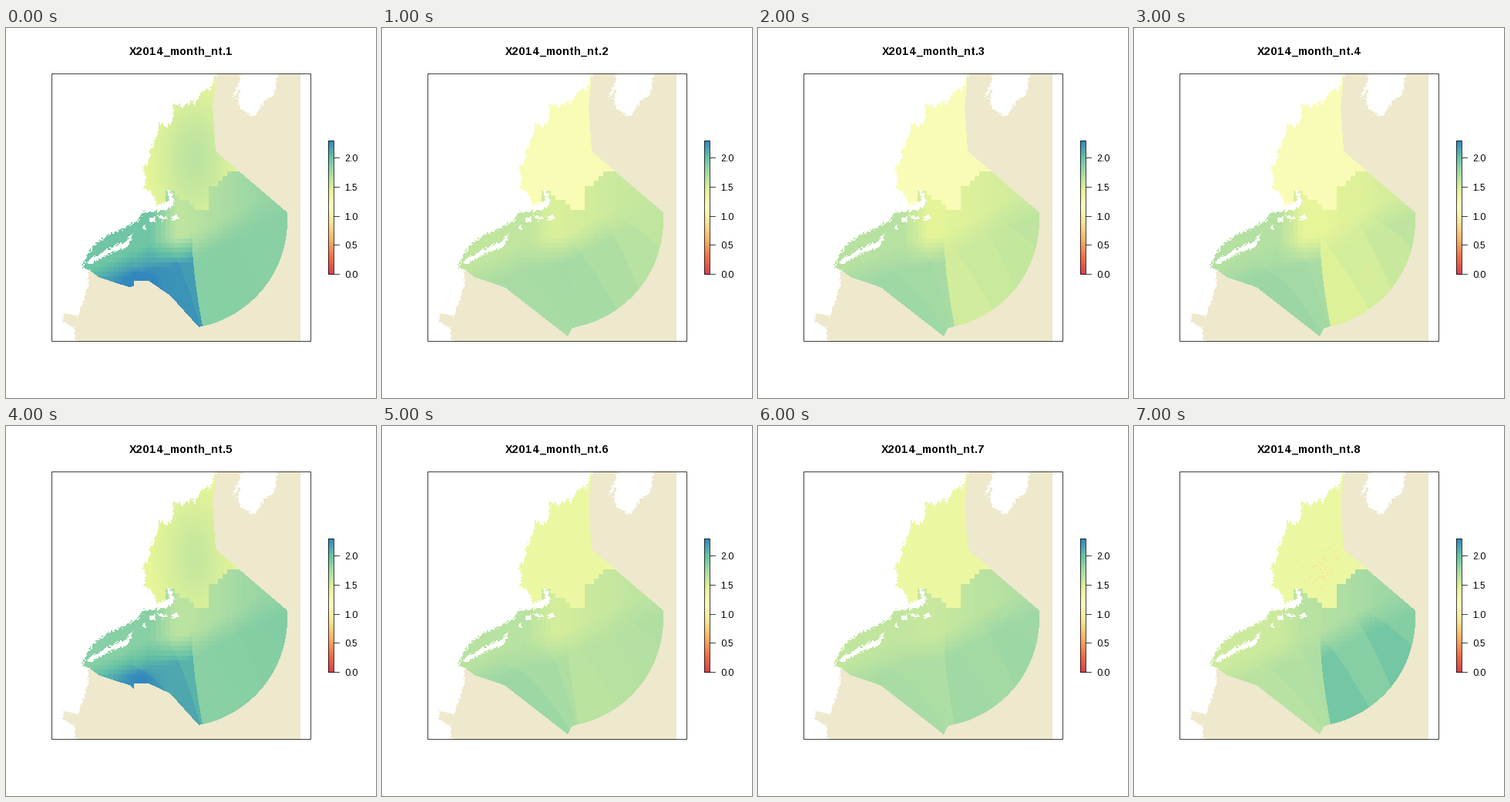
Animation of 480x480 px, one loop 8000 ms. Source, as a matplotlib script:

```python
import numpy as np
import matplotlib.pyplot as plt
from matplotlib.animation import FuncAnimation
from matplotlib.colors import LinearSegmentedColormap
from matplotlib.patches import Rectangle
from matplotlib.path import Path

# whole-pixel glyph advances
plt.rcParams["text.hinting_factor"] = 1

SIZE = 480
TOP = 2.3
BEIGE = np.array([238, 232, 205]) / 255
SPECTRAL = LinearSegmentedColormap.from_list("spectral9", [
    "#D53E4F", "#F46D43", "#FDAE61", "#FEE08B", "#FFFFBF",
    "#E6F598", "#ABDDA4", "#66C2A5", "#3288BD"], N=512)

rng = np.random.default_rng(3)
Y, X = np.mgrid[:SIZE, :SIZE] + 0.5

# Centres of the coarse data cells
CELL = 6.2
BX = (np.floor((X - 2.2) / CELL) + 0.5) * CELL + 2.2
BY = (np.floor(Y / CELL) + 0.5) * CELL


def inside(points, x=X, y=Y):
    pts = np.column_stack([x.ravel(), y.ravel()])
    return Path(points).contains_points(pts).reshape(x.shape)


def ramp(a, b, x):
    return np.clip((x - a) / (b - a), 0, 1)


def bump(x, y, sx, sy):
    return np.exp(-((X - x) / sx) ** 2 - ((Y - y) / sy) ** 2)


# --- land --------------------------------------------------------------
MAINLAND = [
    (20, 20), (274, 20), (272, 64), (268, 74), (262, 81), (250, 88),
    (236, 97), (229, 102), (217, 98), (217, 118), (197, 128), (197, 138),
    (187, 158), (184, 176), (177, 180), (182, 196), (179, 208), (190, 214),
    (196, 230), (213, 224), (208, 210), (216, 214), (218, 229), (206, 237),
    (176, 240), (172, 250), (130, 271), (112, 283), (97, 312), (107, 314),
    (107, 335), (93, 374), (74, 370), (74, 381), (90, 391), (91, 430),
    (20, 430)]
LONG_ISLE = [(102, 306), (110, 299), (135, 286), (156, 276), (167, 264),
             (157, 284), (138, 291), (112, 305)]
NE_BAY = [(307, 50), (356, 50), (346, 88), (335, 95), (322, 116),
          (303, 104), (300, 92), (303, 82), (301, 76)]
INLET = [(293, 94), (297, 82), (308, 61), (300, 82)]
ISLES = [(203, 246, 6, 2.5), (219, 246, 5, 2.5), (190, 249, 4, 3),
         (179, 259, 3, 2)]  # x, y, radii


def land_mask():
    gx, gy = (X // 2).astype(int), (Y // 2).astype(int)
    # deep narrow inlets in the north, a slightly frayed edge elsewhere
    rough = np.where(X < 285, ramp(200, 130, Y), 0)
    dx, dy = rng.normal(0, 1.1, (2, 240, 240))[:, gy, gx]
    inlets = rough * rng.normal(0, 3.5, 240)[gx]
    x, y = X + dx, Y + dy
    mask = inside(MAINLAND, x, y + inlets)
    for shape in (LONG_ISLE, NE_BAY, INLET):
        mask |= inside(shape, x, y)
    for cx, cy, rx, ry in ISLES:
        mask |= ((x - cx) / rx) ** 2 + ((y - cy) / ry) ** 2 < 1
    return mask


# --- study area --------------------------------------------------------
angle = np.linspace(np.radians(-4.5), np.radians(77.5), 40)
ARC = list(zip(224.7 + 140.3 * np.cos(angle), 250 + 140.3 * np.sin(angle)))
NORTH = [(96, 250), (150, 40), (271, 40), (271, 76), (268, 100), (272, 160)]
WEST = [(150, 333), (120, 323), (108, 314), (96, 313)]
TIP = [(246, 390), (241, 400), (160, 337)]


def notched(y):
    return [(250, 388), (213, 347), (185, y), (166, y), (166, y + 7),
            (160, 336)]


land = land_mask()
box = (X > 59) & (X < 382) & (Y > 59) & (Y < 407)


def sea_mask(south):
    return inside(NORTH + ARC + south + WEST) & box & ~land


open_sea = sea_mask(TIP)
cut_sea = {1: sea_mask(notched(328)), 5: sea_mask(notched(334))}

GULF = inside([
    (150, 40), (310, 40), (310, 186), (293, 186), (272, 204), (262, 205),
    (262, 230), (257, 236), (244, 236), (238, 226), (220, 217), (219, 210),
    (207, 210), (207, 236), (150, 236)], BX, BY)

# Curves fanning out over the slope: head, foot and bend
RAYS = [((165, 312), (244, 395), 0.65), ((212, 285), (252, 387), 0.75),
        ((242, 285), (255, 387), 1.5), ((242, 275), (305, 365), 0.8),
        ((285, 250), (333, 338), 0.75), ((295, 238), (358, 282), 0.8)]
wedge = np.zeros((SIZE, SIZE), int)
for (x0, y0), (x1, y1), bend in RAYS:
    wedge += X > x0 + (x1 - x0) * ramp(y0, y1, Y) ** bend

shelf_edge = np.interp(BX, [100, 185, 240, 370], [335, 299, 287, 222])
deep = ramp(-20, 16, BY - shelf_edge)
eastward = ramp(230, 330, BX)
inshore = ramp(222, 188, BX)

# Levels: gulf, tongue, bank, shelf, west slope (outer, inner),
# east slope (inner, outer)
LEVELS = {
    1: (1.40, 1.63, 1.80, 1.97, 2.28, 2.20, 1.87, 1.86),
    2: (1.23, 1.50, 1.60, 1.62, 1.73, 1.75, 1.74, 1.62),
    4: (1.21, 1.42, 1.52, 1.68, 1.79, 1.73, 1.48, 1.63),
    5: (1.39, 1.64, 1.80, 1.87, 2.20, 2.08, 1.86, 1.89),
    6: (1.36, 1.53, 1.63, 1.66, 1.78, 1.70, 1.65, 1.69),
    8: (1.36, 1.66, 1.78, 1.56, 1.66, 1.71, 1.91, 1.92)}


def blend(a, b, t):
    return np.array(LEVELS[a]) * (1 - t) + np.array(LEVELS[b]) * t


LEVELS[3] = blend(4, 2, 0.25)
LEVELS[7] = blend(6, 8, 0.4)

# Speck clouds: centre, spread, count
SPECKS = {4: [(303, 322, 12, 17, 22), (292, 208, 11, 6, 9)],
          8: [(245, 190, 14, 18, 70)]}


def add_specks(field, month):
    for x, y, sx, sy, count in SPECKS.get(month, []):
        for px, py in rng.normal((x, y), (sx, sy), (count, 2)).astype(int):
            field[py, px:px + 2] = 0.85


def month_field(month):
    gulf, tongue, bank, shelf, w_out, w_in, e_in, e_out = LEVELS[month]
    cold = max(0, w_out - 1.8)
    ripple = 0.2 * max(0, e_in - w_in)

    west = np.linspace(w_out, w_in, 3)
    east = np.linspace(e_in, e_out, 4) + ripple * np.array([1, -1, 1, -1])
    slope = np.concatenate([west, east])[wedge]

    shallow = tongue + (bank - tongue) * eastward
    shallow += (shelf - shallow) * inshore
    field = shallow + (slope - shallow) * deep
    field += 0.25 * cold * bump(175, 330, 22, 13)
    field[GULF] = (gulf + 0.5 * cold * bump(245, 170, 48, 85))[GULF]
    add_specks(field, month)
    return field


def month_image(month):
    sea = cut_sea.get(month, open_sea)
    img = np.ones((SIZE, SIZE, 3))
    img[box & ~land] = BEIGE
    img[sea] = SPECTRAL(month_field(month)[sea] / TOP)[:, :3]
    return img


images = [month_image(m) for m in range(1, 9)]

# --- figure ------------------------------------------------------------
fig = plt.figure(figsize=(5, 5), dpi=96, facecolor="white")
ax = fig.add_axes([0, 0, 1, 1])
PX = 0.75  # points per pixel
FONT = "Liberation Sans"
LINE = dict(color="black", lw=0.75 * PX)

chart = ax.imshow(images[0], extent=(0, SIZE, SIZE, 0),
                  interpolation="nearest", aspect="auto")
ax.imshow(np.linspace(1, 0, 174)[:, None], cmap=SPECTRAL, vmin=0, vmax=1,
          extent=(418, 425, 320, 146), interpolation="nearest",
          aspect="auto")


def outline(x0, y0, x1, y1):
    ax.add_patch(Rectangle((x0, y0), x1 - x0, y1 - y0, fill=False, **LINE))


outline(59, 59, 395, 406)
outline(418, 146, 425, 319)
for value in np.arange(0, 2.1, 0.5):
    y = round(319 - value * 75.4)
    ax.plot([425, 432], [y, y], **LINE)
    ax.text(439, y + 5, f"{value:.1f}", family=FONT, size=12 * PX)
title = ax.text(227.5, 35, "", family=FONT, size=14.4 * PX, weight="bold",
                ha="center")
ax.set_xlim(0, SIZE)
ax.set_ylim(SIZE, 0)
ax.axis("off")


def draw(i):
    chart.set_data(images[i])
    title.set_text(f"X2014_month_nt.{i + 1}")
    return chart, title


anim = FuncAnimation(fig, draw, frames=8, interval=1000, repeat=True,
                     repeat_delay=0)
plt.show()
```
